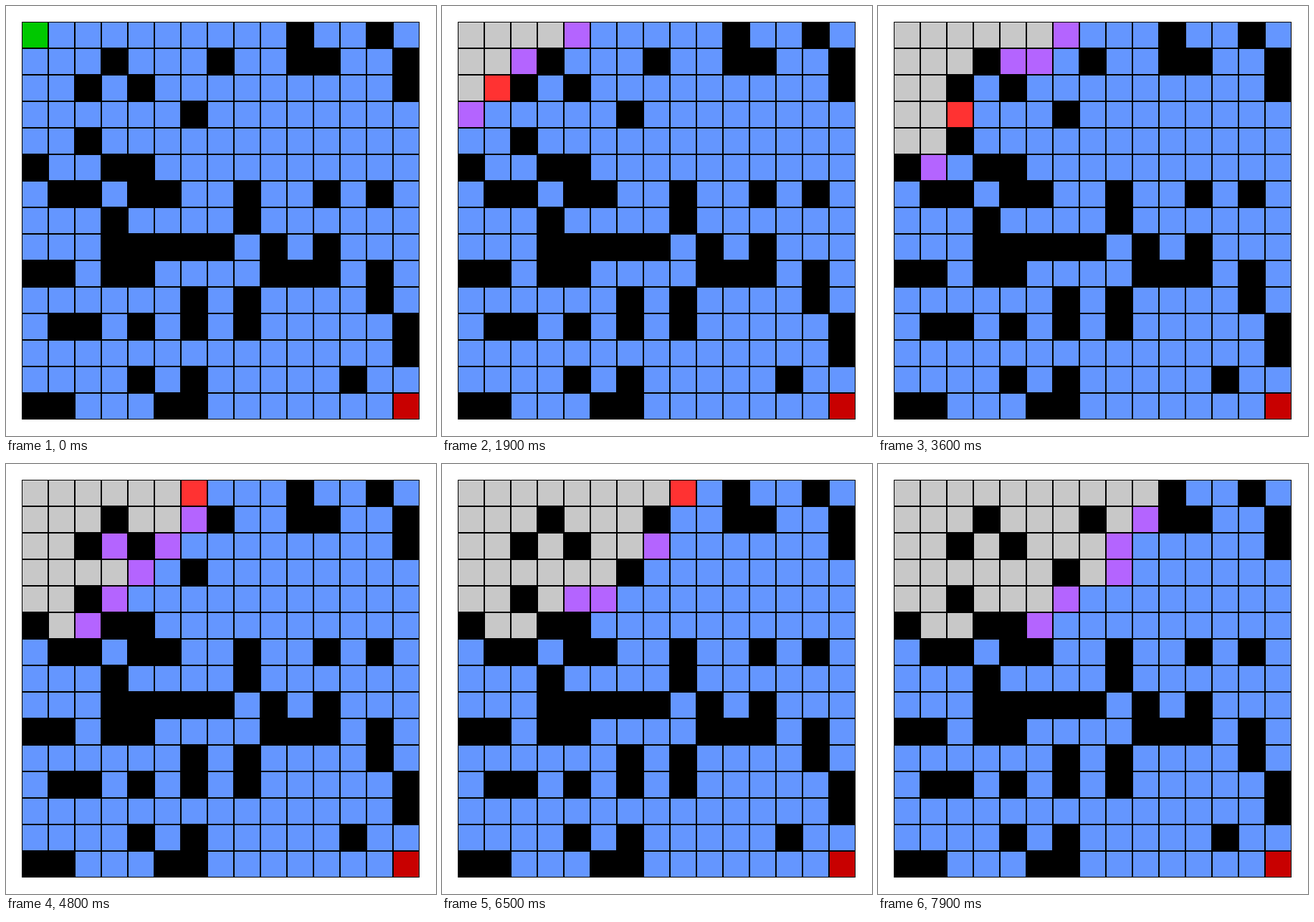
A matplotlib script that plays this animation: 600 by 600 pixels, repeating every 8 s.

```python
import matplotlib.pyplot as plt
from matplotlib.animation import FuncAnimation
from matplotlib.patches import Rectangle

SIZE, MARGIN, CELL = 600, 22, 37
FRAMES, INTERVAL = 80, 100

MAZE = """
S.........#..#.
...#...#..##..#
..#.#.........#
......#........
..#............
#..##..........
.##.##..#..#.#.
...#....#......
...#####.#.#...
##.##....###.#.
......#.#....#.
.##.#.#.#.....#
..............#
....#.#.....#..
##...##.......E
""".split()
N = len(MAZE)

COLORS = {
    ".": (100, 150, 255),  # free
    "#": (0, 0, 0),        # wall
    "S": (0, 200, 0),      # start
    "E": (200, 0, 0),      # end
    "q": (180, 100, 255),  # queued
    "c": (255, 50, 50),    # current
    "v": (200, 200, 200),  # visited
}
RGB = {k: tuple(c / 255 for c in v) for k, v in COLORS.items()}


def sift_down(heap, i):
    """Move heap[i] towards the root while it is nearer than its parent."""
    while i and heap[i][0] < heap[(i - 1) // 2][0]:
        parent = (i - 1) // 2
        heap[i], heap[parent] = heap[parent], heap[i]
        i = parent


def push(heap, item):
    heap.append(item)
    sift_down(heap, len(heap) - 1)


def pop(heap):
    """Binary heap pop; on a tie the right child moves up."""
    last = heap.pop()
    if not heap:
        return last
    top, heap[0] = heap[0], last
    i = 0
    while (child := 2 * i + 1) < len(heap):
        right = child + 1
        if right < len(heap) and not heap[child][0] < heap[right][0]:
            child = right
        heap[i], heap[child] = heap[child], heap[i]
        i = child
    sift_down(heap, i)
    return top


def search():
    """Yield the grid after every visible step of Dijkstra's search."""
    grid = {(r, c): MAZE[r][c] for r in range(N) for c in range(N)}
    yield dict(grid)
    heap, seen = [(0, (0, 0))], {(0, 0)}
    grid[0, 0] = "q"
    yield dict(grid)
    while heap:
        dist, (r, c) = pop(heap)
        grid[r, c] = "c"
        yield dict(grid)
        grid[r, c] = "v"
        for dr, dc in ((-1, 0), (0, 1), (1, 0), (0, -1)):
            cell = r + dr, c + dc
            if cell in seen or grid.get(cell, "#") == "#":
                continue
            seen.add(cell)
            push(heap, (dist + 1, cell))
            grid[cell] = "q"
            yield dict(grid)


states = [grid for _, grid in zip(range(FRAMES), search())]

fig = plt.figure(figsize=(SIZE / 100, SIZE / 100), dpi=100, facecolor="white")
ax = fig.add_axes([0, 0, 1, 1])
ax.set_xlim(0, SIZE)
ax.set_ylim(SIZE, 0)
ax.axis("off")


def square(x, y, side, color):
    return ax.add_patch(Rectangle((x, y), side, side, facecolor=color,
                                  linewidth=0, antialiased=False))


square(MARGIN, MARGIN, N * CELL, "black")
tiles = {
    (r, c): square(MARGIN + c * CELL + 1, MARGIN + r * CELL + 1, CELL - 2, RGB[kind])
    for (r, c), kind in states[0].items() if kind != "#"
}


def update(i):
    for cell, tile in tiles.items():
        tile.set_facecolor(RGB[states[i][cell]])
    return list(tiles.values())


anim = FuncAnimation(fig, update, frames=FRAMES, interval=INTERVAL,
                     repeat=True, repeat_delay=0)
plt.show()
```
